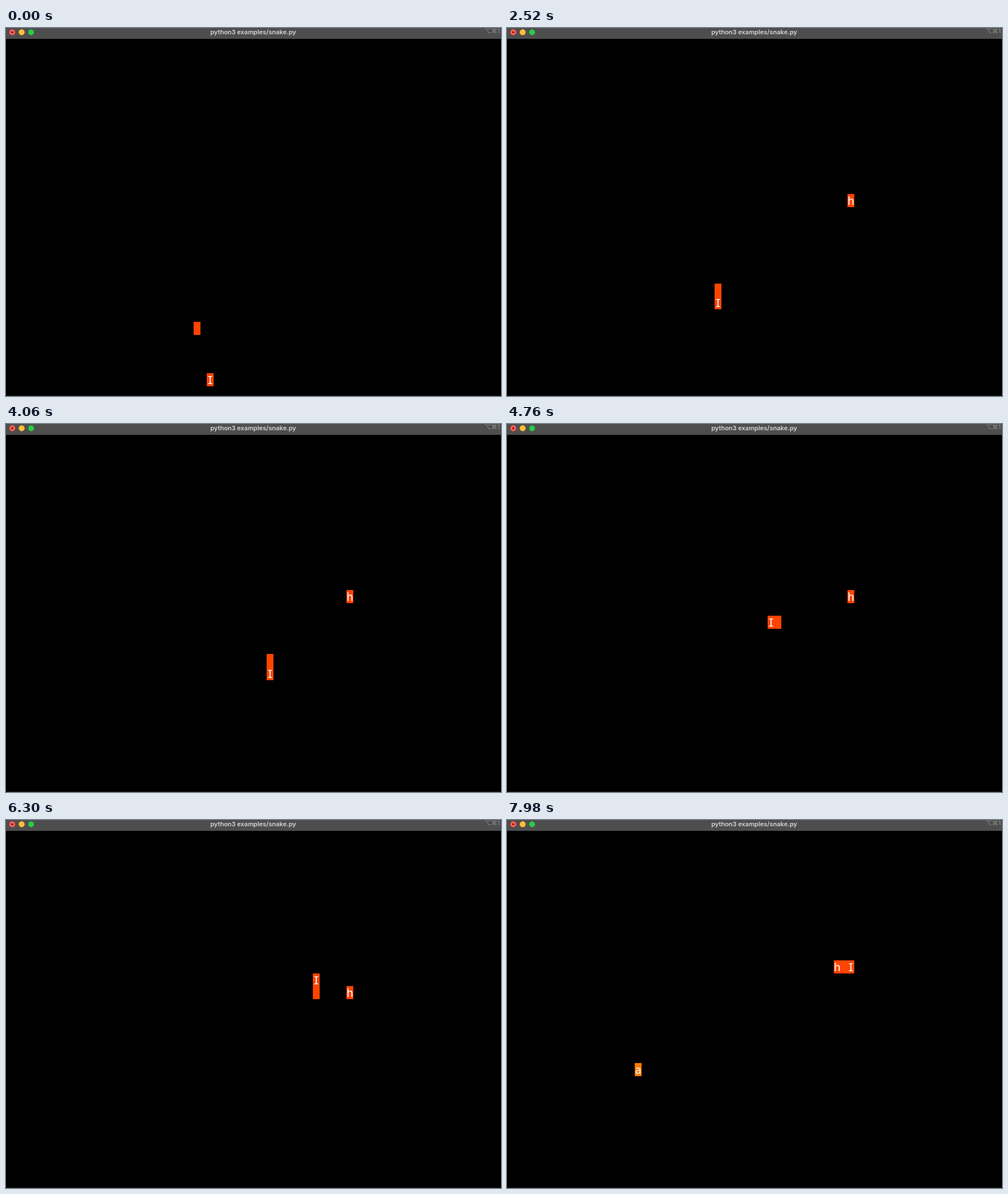
Write an HTML page that moves like this. It is 868 px wide and 645 px high and loops after 8 s.

```html
<!DOCTYPE html>
<html lang="en">
<head>
<meta charset="utf-8">
<title>Snake</title>
<style>
  html, body { margin: 0; width: 100%; height: 100%; overflow: hidden; background: #000; }
  svg { display: block; width: 868px; height: 645px; }
  .title { font: 600 11px Inter, sans-serif; fill: #d6d6d6; text-anchor: middle; }
  .keys { font: 11px Inter, "DejaVu Sans", sans-serif; fill: #8e8e8e; text-anchor: end; }
  .cell text { font: 19.4px "Noto Sans Mono", monospace; fill: #fff; text-anchor: middle; }
</style>
</head>
<body>
<svg id="stage" viewBox="0 0 868 645">
  <rect width="868" height="645"/>
  <rect width="868" height="19" fill="#4e4e4e"/>
  <rect y="644" width="868" height="1" fill="#1c1c1c"/>
  <g stroke-width="0.7">
    <circle cx="11" cy="7.5" r="5" fill="#fe6159" stroke="#e24b41"/>
    <circle cx="27.5" cy="7.5" r="5" fill="#fdbf3b" stroke="#de9f34"/>
    <circle cx="44" cy="7.5" r="5" fill="#2bca4b" stroke="#1dad2b"/>
  </g>
  <circle cx="11" cy="7.5" r="1.7" fill="#7a0f0a"/>
  <text class="title" x="433.5" y="11">python3 examples/snake.py</text>
  <text class="keys" x="866" y="9">⌥⌘1</text>
</svg>
<script>
  const LOOP = 8000, TICK = 70, STEP = 155.3, DELAY = 4;
  const DIRS = { U: [0, -1], D: [0, 1], L: [-1, 0], R: [1, 0] };
  const ROUTE = "U4 L4 U2 R5 U2 R8 U4 R5 U3 R2 D2 R5 U3 L2";

  // Each letter starts as food and becomes the head once eaten.
  const letters = [
    { char: "I", color: "#ff4400", at: [30, 26], eaten: 0 },
    { char: "", color: "#ff4400", at: [28, 22], eaten: 6 },
    { char: "h", color: "#ff4400", at: [51, 12], eaten: 47 },
    { char: "a", color: "#ff7a00", at: [19, 18], eaten: Infinity }
  ];

  const path = [[30, 26]];
  for (const leg of ROUTE.split(" ")) {
    const [dx, dy] = DIRS[leg[0]];
    for (let i = 0; i < +leg.slice(1); i++) {
      const [x, y] = path[path.length - 1];
      path.push([x + dx, y + dy]);
    }
  }

  const stage = document.getElementById("stage");

  function add(parent, tag, attrs) {
    const el = document.createElementNS("http://www.w3.org/2000/svg", tag);
    for (const name in attrs) el.setAttribute(name, attrs[name]);
    return parent.appendChild(el);
  }

  for (const letter of letters) {
    letter.el = add(stage, "g", { class: "cell" });
    add(letter.el, "rect", { width: 12, height: 23, fill: letter.color });
    add(letter.el, "text", { x: 6, y: 18.5 }).textContent = letter.char;
  }

  function draw(time) {
    const tick = Math.floor((time % LOOP) / TICK) * TICK;
    const move = Math.max(0, Math.floor((tick - DELAY) / STEP));
    const length = letters.filter(l => l.eaten <= move).length;
    letters.forEach((letter, i) => {
      const [col, row] = i < length ? path[Math.max(0, move - (length - 1 - i))] : letter.at;
      const x = Math.round(2.1 + col * 11.66);
      const y = Math.round(22.4 + row * 22.4);
      letter.el.setAttribute("transform", `translate(${x} ${y})`);
      letter.el.setAttribute("visibility", i <= length ? "visible" : "hidden");
    });
  }

  let start;
  function loop(now) {
    start ??= now;
    draw(now - start);
    requestAnimationFrame(loop);
  }
  draw(0);
  requestAnimationFrame(loop);
</script>
</body>
</html>
```
